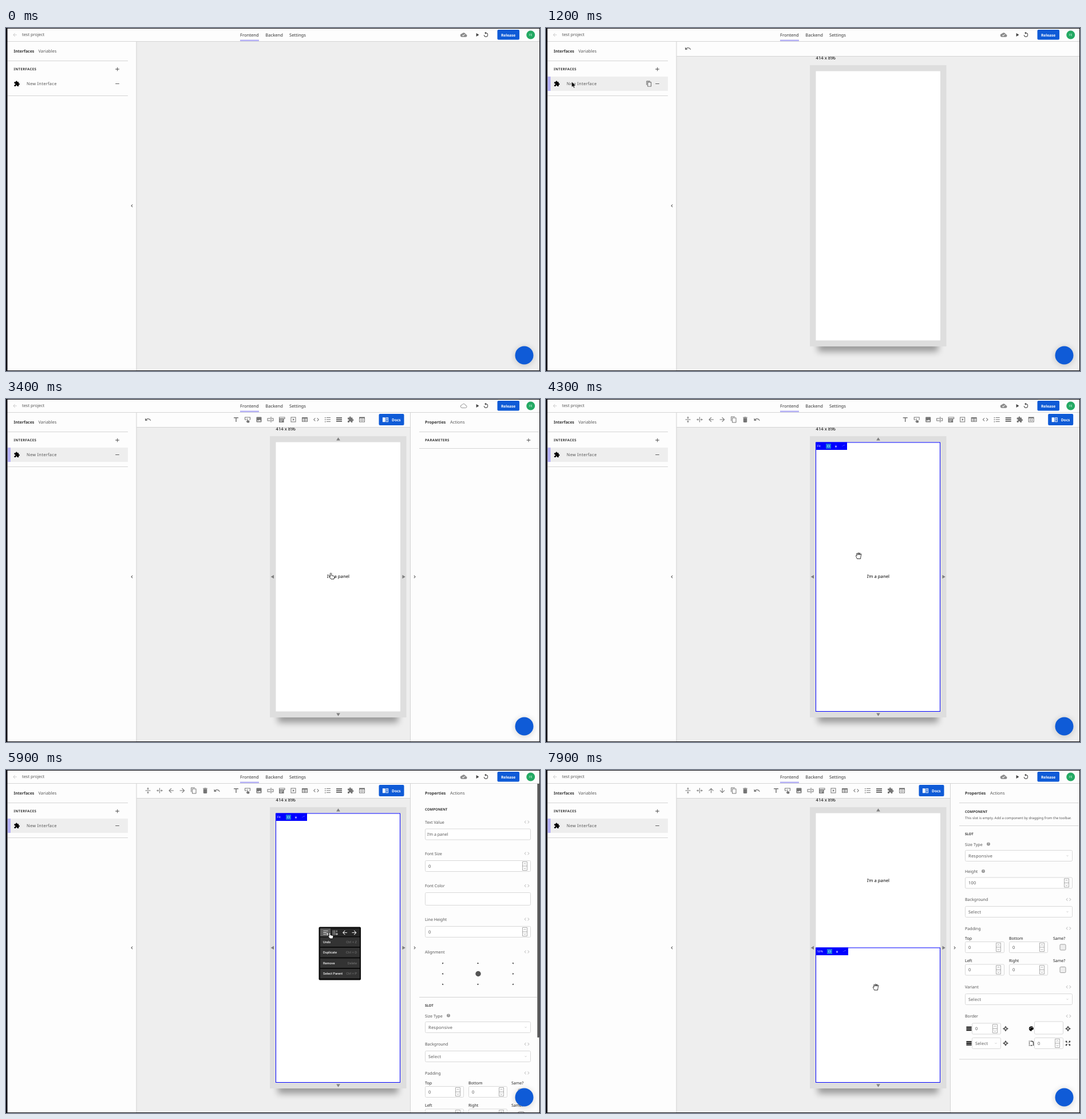
An HTML page that plays this animation: 933 px wide and 600 px high, repeating every 8 s.

```html
<!DOCTYPE html>
<html lang="en">
<head>
<meta charset="utf-8">
<title>Interface builder</title>
<style>
  html, body { margin: 0; width: 100%; height: 100%; overflow: hidden; background: #eee; }
  svg { display: block; width: 933px; height: 600px; }
  text { font: 7.4px "Noto Sans", sans-serif; fill: #555; text-rendering: geometricPrecision; }
  .tab { font-weight: 500; font-size: 7.6px; fill: #333; }
  .bold { font-weight: 700; font-size: 7px; fill: #333; }
  .head { font-weight: 700; font-size: 6px; fill: #333; }
  .wide { letter-spacing: .4px; }
  .label { font-size: 7.1px; }
  .value { font-size: 7.4px; letter-spacing: .3px; fill: #555; }
  .side { font-weight: 500; font-size: 7px; fill: #222; }
  .white { font-weight: 700; font-size: 6.6px; fill: #fff; }
  .black { font-size: 7.7px; fill: #000; }
  .menu { font: 500 5.7px Roboto, sans-serif; fill: #eee; }
  .key { font: 5.8px Roboto, sans-serif; fill: #777; }
  .mid { text-anchor: middle; }
  .field { fill: #fff; stroke: #d8d8d8; }
  path { fill-rule: evenodd; }
</style>
</head>
<body>
<svg id="stage" viewBox="0 0 933 600"></svg>
<script>
const BLUE = '#0f5bd7', GREY = '#757575', LOOP = 8000;

// Icons in a 24 x 24 box
const ICONS = {
  back: 'M20 11H7.8l5.6-5.6L12 4l-8 8 8 8 1.4-1.4L7.8 13H20z',
  copy: 'M16 1H4c-1.1 0-2 .9-2 2v14h2V3h12zM19 5H8c-1.1 0-2 .9-2 2v14c0 1.1.9 2 2 2h11c1.1 0 2-.9 2-2V7c0-1.1-.9-2-2-2zm0 16H8V7h11z',
  puzzle: 'M20.5 11H19V7c0-1.1-.9-2-2-2h-4V3.5a2.5 2.5 0 0 0-5 0V5H4c-1.1 0-2 .9-2 2v3.8h1.5a2.7 2.7 0 0 1 0 5.4H2V20c0 1.1.9 2 2 2h3.8v-1.5a2.7 2.7 0 0 1 5.4 0V22H17c1.1 0 2-.9 2-2v-4h1.5a2.5 2.5 0 0 0 0-5z',
  trash: 'M6 19c0 1.1.9 2 2 2h8c1.1 0 2-.9 2-2V7H6zM19 4h-3.5l-1-1h-5l-1 1H5v2h14z',
  undo: 'M12.5 8c-2.6 0-5 1-6.9 2.6L2 7v9h9l-3.6-3.6a8 8 0 0 1 12.7 3.6l2.4-.8C21 11 17.1 8 12.5 8z',
  split: 'M8 19h3v4h2v-4h3l-4-4zM16 5h-3V1h-2v4H8l4 4zM3 11v2h18v-2z',
  text: 'M4 4v3h6.5v13h3V7H20V4z',
  button: 'M2 3h20v10h-3v-2h1V5H4v6h4v2H2zM10 8h2v6l7 2-1 7h-7l-5-6 4 1z',
  image: 'M21 19V5c0-1.1-.9-2-2-2H5c-1.1 0-2 .9-2 2v14c0 1.1.9 2 2 2h14c1.1 0 2-.9 2-2zM8.5 13.5l2.5 3 3.5-4.5 4.5 6H5z',
  input: 'M1 7h11v2H3v6h9v2H1zM16 7h7v10h-7v-2h5V9h-5zM13 2h2v20h-2z',
  form: 'M2 3h21v7h-4v12H2zM4 5v3h17V5zM5 12v2h11v-2zM5 17v2h8v-2z',
  video: 'M3 3h18v18H3zM5 5v14h14V5zM10 8v8l6-4z',
  table: 'M2 4h20v16H2zM4 9v4h7V9zM13 9v4h7V9zM4 15v3h7v-3zM13 15v3h7v-3z',
  code: 'M9.4 16.6L4.8 12l4.6-4.6L8 6l-6 6 6 6zM14.6 16.6l4.6-4.6-4.6-4.6L16 6l6 6-6 6z',
  list: 'M2 4h3v3H2zM8 4h14v2H8zM2 11h3v3H2zM8 11h14v2H8zM2 18h3v3H2zM8 18h14v2H8z',
  lines: 'M2 4h20v4H2zM2 10h20v4H2zM2 16h20v4H2z',
  embed: 'M2 3h20v18H2zM4 8v11h16V8zM10 9.500l1.400 1.400-2.600 2.600 2.600 2.600L10 17.500l-4-4zM14 9.500l4 4-4 4-1.400-1.400 2.600-2.600-2.600-2.600z',
  book: 'M1 4h10v17H1zM13 4h10v17H13zM15 6v13h6V6zM16 8h4v2h-4zM16 12h4v2h-4z',
  replay: 'M12 5V1L7 6l5 5V7a6 6 0 1 1-6 6H4a8 8 0 1 0 8-8z',
  play: 'M7 4v16l13-8z',
  cloud: 'M19.4 10A7.500 7.500 0 0 0 5.400 8 6 6 0 0 0 6 20h13a5 5 0 0 0 .4-10z',
  check: 'M10 17l-3.500-3.500 1.400-1.400 2.100 2.100L15.200 9l1.400 1.400z',
  chevron: 'M15.4 7.4L14 6l-6 6 6 6 1.400-1.400L10.800 12z',
  plus: 'M11 4h2v7h7v2h-7v7h-2v-7H4v-2h7z',
  minus: 'M4 11h16v2H4z',
  addRow: 'M2 4h20v2H2zM2 11h14v2H2zM2 18h11v2H2zM18 12h2v5h4v2h-4v4h-2v-4h-4v-2h4z',
  addCol: 'M3 2h2v20H3zM10 2h2v20h-2zM18 2h2v9h-2zM18 13h2v4h4v2h-4v4h-2v-4h-4v-2h4z',
  move: 'M12 0l5 7-5 3-5-3zM12 24l5-7-5-3-5 3zM0 12l7-5 3 5-3 5zM24 12l-7-5-3 5 3 5z',
  expand: 'M2 2h7L7 4l3 4-2 2-4-3-2 2zM22 2v7l-2-2-4 3-2-2 3-4-2-2zM2 22v-7l2 2 4-3 2 2-3 4 2 2zM22 22h-7l2-2-3-4 2-2 4 3 2-2z',
  palette: 'M12 2a10 10 0 0 0 0 20c3 0 0-5 4-5h3c6-6 0-15-7-15zM5 10h3v3H5zM9 5h3v3H9zM15 6h3v3h-3z',
  corner: 'M2 2h3v3H2zM2 7h3v4H2zM2 13h3v4H2zM2 19h3v4H2zM8 2h6a8 8 0 0 1 8 8v12h-3V10a5 5 0 0 0-5-5H8zM8 20h8v3H8z',
  lock: 'M5 10h2V7a5 5 0 0 1 10 0v3h2v12H5zM9 10h6V7a3 3 0 0 0-6 0z',
  frame: 'M2 5h20v14H2zM5 8v8h14V8z',
  grip: 'M3 10h4v3H3zM10 6h4v3h-4zM15 4h7v3h-7z'
};

const text = (x, y, s, cls = '') => `<text x="${x}" y="${y + 2.6}" class="${cls}">${s}</text>`;
const rect = (x, y, w, h, fill, more = '') =>
  `<rect x="${x}" y="${y}" width="${w}" height="${h}" fill="${fill}" ${more}/>`;
const icon = (name, x, y, size = 12, fill = GREY, turn = 0, more = '') =>
  `<path d="${ICONS[name]}" fill="${fill}" ${more} transform="translate(${x} ${y}) rotate(${turn}) scale(${size / 24}) translate(-12 -12)"/>`;
const group = (on, ...parts) => `<g data-on="${on}">${parts.join('')}</g>`;
const hline = (x, y, w, fill = '#d4d4d4') => rect(x, y, w, 1, fill);

// Form controls; y is the vertical centre
const field = (x, y, right, s = '', h = 20) =>
  `<rect class="field" x="${x + .5}" y="${y - h / 2 + .5}" width="${right - x - 1}" height="${h - 1}" rx="2"/>` + text(x + 6, y + .2, s, 'value');
const number = (x, y, right, s = '0') => field(x, y, right, s) +
  `<path d="M${right - 14.5} ${y - 7.500}h8v15h-8zM${right - 14.5} ${y}h8M${right - 12.5} ${y - 3}l2-2 2 2M${right - 12.5} ${y + 3}l2 2 2-2" fill="none" stroke="#888" stroke-width=".7"/>`;
const select = (x, y, right, s) => field(x, y, right, s) + icon('chevron', right - 9, y, 7, '#ccc', -90);
const label = (y, s, codeX) => text(732, y, s, 'label') + (codeX ? icon('code', codeX, y, 11, '#c4c4c4') : '');
const help = y => `<circle cx="773" cy="${y - .5}" r="3" fill="#999"/><text x="773" y="${y + 1.3}" class="mid" style="font-size:5px;fill:#fff">?</text>`;

function slot(y, right, height) {
  const codeX = right - 7, mid = right > 918 ? 809 : 808;
  const sides = (dy, a, b) =>
    text(732, y + dy, a, 'side') + text(mid, y + dy, b, 'side') + text(right - 34, y + dy, 'Same?', 'side') +
    number(732, y + dy + 16, mid - 8) + number(mid, y + dy + 16, mid + 68) +
    rect(right - 22, y + dy + 11, 10, 10, '#eee', 'rx="1.5" stroke="#888" stroke-width=".8"');
  let s = text(732, y, 'SLOT', 'head') + label(y + 18.5, 'Size Type') + help(y + 18.5) +
    select(732, y + 38.5, right, 'Responsive');
  if (height) {
    s += label(y + 66, 'Height') + `<g transform="translate(-9 0)">${help(y + 66)}</g>` + number(732, y + 86, right, '100');
    y += 47;
  }
  s += label(y + 68, 'Background', codeX) + select(732, y + 89.5, right, 'Select') +
    label(y + 118.5, 'Padding', codeX) + sides(135.5, 'Top', 'Bottom') + sides(175, 'Left', 'Right') +
    label(y + 221, 'Variant', codeX) + select(732, y + 242.5, right, 'Select') + label(y + 272, 'Border', codeX);
  const a = y + 294, b = y + 319.5;
  return s + icon('lines', 739, a, 11, '#111') + number(744, a, 795) + icon('move', 803, a, 10, '#555') +
    icon('palette', 848, a, 10, '#000') + field(853, a - 1.5, 904, '', 23) + icon('move', 912, a, 10, '#555') +
    icon('lines', 739, b, 11, '#111') + select(744, b, 795, 'Select') + icon('move', 803, b, 10, '#555') +
    icon('corner', 848, b, 10, '#333') + number(853, b, 904) + icon('expand', 912, b, 10, '#444') +
    hline(722, y + 347, 209);
}

function component(full) {
  const d = full ? 20 : 0, end = full ? 397 : 322;
  let s = text(732, 68, 'COMPONENT', 'head') + label(91, 'Text Value', 910);
  if (full) s += field(732, 112.5, 917) + text(736, 112.5, 'I’m a panel', 'label');
  s += label(126 + d, 'Font Size', 910) + number(732, 148 + d, 917) +
    label(182.5 + d, 'Font Color', 910) + field(732, 205.5 + d, 917, '', 23) +
    label(241 + d, 'Line Height', 910) + number(732, 263 + d, 917) + label(298 + d, 'Alignment', 910);
  if (full) {
    s += '<circle cx="825" cy="356.5" r="4.7" fill="#555"/>';
    for (let i = -1; i <= 1; i++) for (let j = -1; j <= 1; j++)
      if (i || j) s += icon('play', 824.5 + i * 61.5, 356.5 + j * 18.5, 4.5, '#333', Math.atan2(j, i) * 180 / Math.PI);
  }
  return s + hline(722, end, 206) + slot(end + 14.5, 917) + rect(928.5, 23, 3, full ? 445 : 497, '#444', 'rx="1"');
}

const emptySlot = height => text(732, 72, 'COMPONENT', 'head') +
  '<text x="732" y="86.300" style="font-size:6px">This slot is empty. Add a component by dragging from the toolbar.</text>' +
  hline(722, 97, 209) + slot(111.5, 920, height);

const selection = (y, tag, dx) => rect(471.5, y + .5, 217, 546 - y, 'none', 'stroke="#00f"') +
  rect(472, y, 54 + dx, 13.5, '#00f') + `<text x="474" y="${y + 8.500}" style="font-size:5px;fill:#fff">${tag}</text>` +
  rect(489 + dx, y + 2.5, 9, 9, '#1670dc') + icon('frame', 493.5 + dx, y + 7, 6, '#8fe0ff') +
  icon('lock', 506.5 + dx, y + 7, 5, '#9d9dff') + icon('grip', 519.5 + dx, y + 7, 6, '#7d7dff');

const menuRow = (i, name, key) => rect(549, 292.5 + i * 18.5, 69, 16.5, '#333') +
  `<text x="554" y="${302.5 + i * 18.5}" class="menu">${name}</text>` +
  `<text x="613" y="${302.5 + i * 18.5}" class="key" text-anchor="end">${key}</text>`;

const tools = ['text', 'button', 'image', 'input', 'form', 'video', 'table', 'code', 'list', 'lines', 'puzzle', 'embed'];
const CLOUD_BUSY = '3400-3500,4900-5000,5200-5300,6100-6200,6600-6700,7100-7900';
const CLOUD_IDLE = '0-3400,3500-4900,5000-5200,5300-6100,6200-6600,6700-7100,7900-8000';
const PANEL = '1500-4300,4600-8000';

stage.innerHTML = `<defs><filter id="blur" x="-20%" y="-200%" width="140%" height="500%"><feGaussianBlur stdDeviation="6"/></filter></defs>` +
  rect(0, 0, 933, 600, '#eee') +
  // Preview
  group('1100-8000',
    rect(475, 548, 210, 18, '#000', 'opacity=".36" filter="url(#blur)"'),
    rect(461, 65, 238.5, 492, '#dedede'), rect(471.5, 75.5, 217.5, 471, '#fff'),
    text(471.5, 52.2, '414 x 896', 'black'), rect(228, 24, 704, 25, '#fdfdfd'), hline(228, 49, 704)) +
  group('1500-8000', icon('play', 580.5, 70.5, 10, '#808080', -90), icon('play', 580.5, 551.5, 10, '#808080', 90),
    icon('play', 466, 311, 10, '#808080', 180), icon('play', 694.5, 311, 10, '#808080')) +
  group('1500-3400', rect(518, 296, 124.5, 29.5, BLUE, 'rx="2"'), group('3200-3400', rect(518, 296, 124.5, 29.5, '#0a49b3', 'rx="2"')),
    icon('plus', 580.3, 306, 9, '#fff'), '<text x="580.3" y="319.5" class="mid" style="fill:#fff">Add your first panel or drag here</text>') +
  group('3400-6100', text(580.3, 310.5, 'I’m a panel', 'black mid')) +
  group('6100-8000', text(580.3, 193, 'I’m a panel', 'black mid')) +
  group('3500-7100', selection(75.5, 'Fit', 0)) + group('7100-8000', selection(310.5, '50%', 2)) +
  // Toolbar
  group('1100-4300', icon('undo', 248, 36)) +
  group('4300-8000', icon('split', 248, 36), icon('split', 268.5, 36, 12, GREY, 90),
    group('4300-7100', icon('back', 288.5, 36, 13), icon('back', 308, 36, 13, GREY, 180)),
    group('7100-8000', icon('back', 288.5, 36, 13, GREY, 90), icon('back', 308, 36, 13, GREY, -90)),
    icon('copy', 328, 36), icon('trash', 348, 36, 13), icon('undo', 368.5, 36)) +
  `<g id="tools" data-on="1500-8000">${tools.map((n, i) => icon(n, 402 + i * 20, 36)).join('')}` +
  rect(651.5, 26, 44, 20, BLUE, 'rx="2"') + icon('book', 663, 36, 11, '#fff') + text(674, 36, 'Docs', 'white') + '</g>' +
  // Left panel
  rect(2, 24, 225.5, 575, '#fdfdfd') + rect(227.5, 24, 1, 575, '#d4d4d4') +
  text(13.5, 40, 'Interfaces', 'bold') + text(56.5, 40, 'Variables') + hline(3, 57, 210) +
  text(13.5, 71.7, 'INTERFACES', 'head wide') + icon('plus', 194.5, 72, 10, '#444') +
  group('1100-8000', rect(3, 85, 210, 25, '#eee'), rect(3, 85, 5, 25, '#b5b1f6')) +
  icon('puzzle', 19, 97.500, 11, '#000') + text(36, 97.500, 'New Interface', 'value') +
  group('600-1400', icon('copy', 180, 97.5, 11, '#555')) + icon('minus', 194.5, 97.500, 10, '#444') +
  hline(3, 118, 210) + icon('chevron', 220, 311, 10, '#333') +
  // Right panel
  group(PANEL, rect(706.5, 24, 225.5, 575, '#fdfdfd'), rect(706, 24, 1, 575, '#d4d4d4'),
    text(732, 40, 'Properties', 'bold'), text(776, 40, 'Actions'), hline(722, 57, 209), icon('chevron', 714, 311, 10, '#333', 180)) +
  group('1500-4300', text(732, 71.7, 'PARAMETERS', 'head wide'), icon('plus', 913, 72, 10, '#444'), hline(722, 86, 209)) +
  group('4600-6100', rect(722, 57, 209, 1, '#fdfdfd')) +
  group('4900-5200', component(false)) + group('4600-4900,5200-6100', component(true)) +
  group('6100-7100', emptySlot(false)) + group('7100-8000', emptySlot(true)) +
  // Context menu
  group('4900-6100', rect(546.5, 274.5, 73.5, 93, '#0c0c0c', 'rx="2"'), rect(549, 277, 69, 14, '#262626'),
    group('5500-6100', rect(549, 277, 18, 14, '#5c5c5c')),
    icon('addRow', 558.500, 284.5, 10, '#eee'), icon('addCol', 575, 284.5, 10, '#eee'),
    icon('back', 592, 284.5, 12, '#eee'), icon('back', 608.5, 284.5, 12, '#eee', 180),
    menuRow(0, 'Undo', 'Ctrl + Z'), menuRow(1, 'Duplicate', 'Ctrl + D'),
    menuRow(2, 'Remove', 'Delete'), menuRow(3, 'Select Parent', 'Ctrl + P')) +
  // Top bar
  rect(2, 1, 930, 22.5, '#fdfdfd') + hline(2, 23, 930) + icon('back', 15.5, 12, 10, '#ccc') + text(28, 11.5, 'test project') +
  text(409, 12, 'Frontend', 'tab') + text(453.300, 12, 'Backend', 'tab') + text(495, 12, 'Settings', 'tab') +
  rect(409, 20.5, 33, 2.5, '#b5b1f6') +
  group(CLOUD_IDLE, icon('cloud', 799.700, 12, 11.5, '#8a8a8a'), icon('check', 799.700, 12, 11.5, '#fff')) +
  group(CLOUD_BUSY, icon('cloud', 799.700, 12, 10.5, 'none', 0, 'stroke="#8a8a8a" stroke-width="2"')) +
  icon('play', 823.5, 12, 9, '#444') + icon('replay', 838.500, 11.500, 11, '#333') +
  rect(858.5, 3, 38.500, 17.500, BLUE, 'rx="2"') + text(877.600, 12, 'Release', 'white mid') +
  '<circle cx="916.700" cy="12" r="7.500" fill="#23a963"/><text x="916.700" y="14" class="mid" style="font-size:5.5px;fill:#d5f2e1">FE</text>' +
  // Chat button
  '<circle cx="905.5" cy="574" r="16" opacity=".18" filter="url(#blur)"/>' + `<circle cx="905.5" cy="572.500" r="16" fill="${BLUE}"/>` +
  // Cursor
  `<g id="cursor" fill="#fff" stroke="#000" stroke-width=".8" stroke-linejoin="round">` +
  group('200-3000', '<path d="M0 0V9.5L2.200 7.600 3.700 11 5.200 10.300 3.800 7.100H6.700z" fill="#000" stroke="#fff" stroke-width=".5"/>') +
  group('3000-3700,5300-6100', '<path d="M3.500.5c1 0 1.300.6 1.300 1.200v3l4 .9c.9.3 1.100 1 .9 1.800L9 11H4L.6 6.800c.4-.8 1.200-.8 1.800-.1v-5c0-.7.4-1.200 1.100-1.200z"/>') +
  group('3700-5300,6100-8000', '<path d="M2.500 11C2 9 .5 7.500.5 6s1.200-1 1.700-.2L1.600 2.500c-.2-1.200 1.200-1.400 1.500-.4L4 4V1.200c0-1 1.600-1 1.700 0L5.900 4l.7-2.600C6.900.5 8.200.8 8 1.900l-.3 2.400 1.100-1.500c.6-.7 1.600 0 1.200.9C9.200 6 9 7 8.800 8.500L8.500 11z"/>') +
  '</g>' +
  // Window edge
  rect(0, 0, 2.500, 600, '#0b0b10') + rect(0, 0, 933, 1, '#0b0b10') + rect(932, 0, 1, 600, '#0b0b10') + rect(0, 599, 933, 1, '#0b0b10');

// Pointer stops: time, x, y, and 1 when it glides there from the previous stop
const STOPS = [
  [200, 110, 144], [800, 45, 94, 1], [1200, 45, 94], [1900, 520, 225, 1], [2300, 540, 227, 1],
  [2700, 547, 244], [2800, 557, 274], [3000, 560, 291], [3200, 564, 304], [3700, 552, 290],
  [3800, 541, 278], [4000, 541, 268.5], [5200, 546, 274], [5300, 552, 279], [5500, 560, 283],
  [5800, 562, 284], [6100, 590, 380], [6200, 604, 421], [6400, 600, 455], [6600, 584, 446],
  [6700, 577, 440], [7100, 587, 432], [7400, 580, 420], [7500, 573, 411], [7700, 560, 444], [7900, 571, 374]
];

function pointerAt(t) {
  const i = Math.max(0, STOPS.findLastIndex(s => s[0] <= t));
  const [t0, x, y] = STOPS[i], next = STOPS[i + 1];
  if (!next || !next[3] || t < t0) return [x, y];
  const k = (t - t0) / (next[0] - t0);
  return [x + (next[1] - x) * k, y + (next[2] - y) * k];
}

const timed = [...document.querySelectorAll('[data-on]')].map(el =>
  [el, el.dataset.on.split(',').map(r => r.split('-').map(Number))]);
const toolsEl = document.getElementById('tools'), cursorEl = document.getElementById('cursor');

function draw(now) {
  const t = Math.floor(now % LOOP / 100) * 100;
  for (const [el, spans] of timed)
    el.style.display = spans.some(([a, b]) => t >= a && t < b) ? '' : 'none';
  toolsEl.setAttribute('transform', `translate(${t >= 4300 && t < 4600 ? 225.7 : 0} 0)`);
  cursorEl.setAttribute('transform', `translate(${pointerAt(t)})`);
  requestAnimationFrame(draw);
}
draw(0);
</script>
</body>
</html>
```
